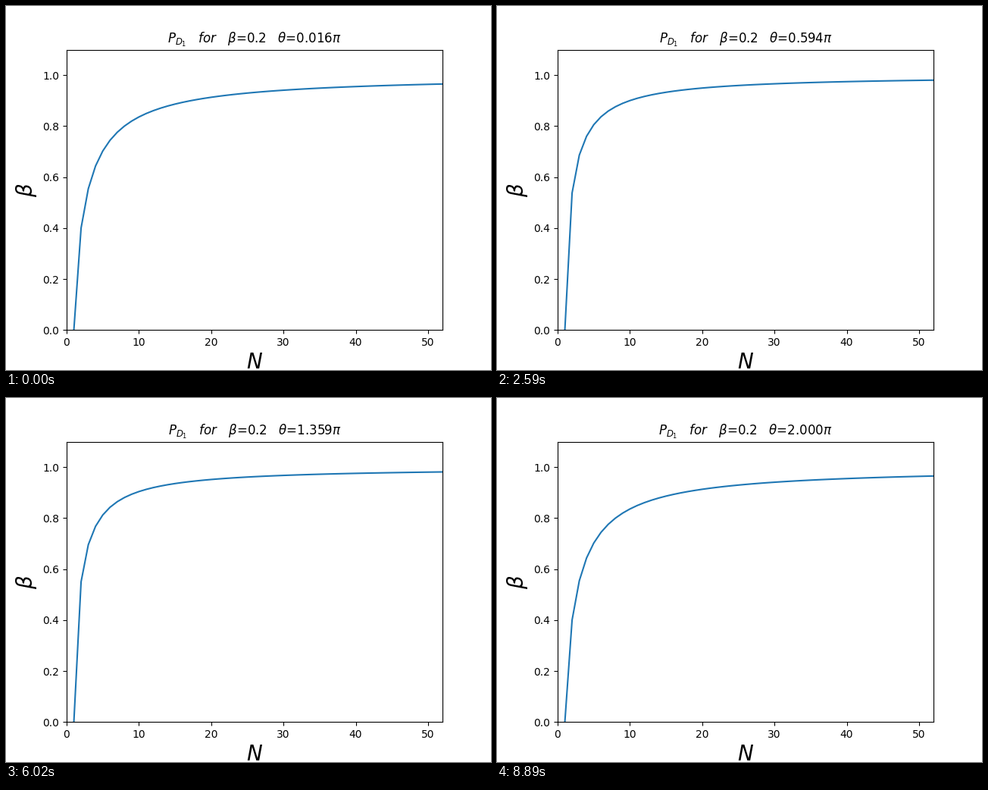
A matplotlib script for the animation above (8960 ms loop, 640x480 px).

```python
import numpy as np
import matplotlib.pyplot as plt
from matplotlib.animation import FuncAnimation

FRAMES = 128
INTERVAL = 70
BETA = 0.2
CYCLES = np.arange(1, 61)


def survival(n, theta):
    """Amplitude left in the first arm after n weak rotations with a lossy second arm."""
    c, s = np.cos(np.pi / (2 * n)), np.sin(np.pi / (2 * n))
    loss = BETA * np.exp(1j * theta)
    step = np.array([[c, -s], [loss * s, loss * c]])
    return abs(np.linalg.matrix_power(step, n)[0, 0])


fig, ax = plt.subplots(figsize=(6.4, 4.8), dpi=100)
line, = ax.plot([], [], color="C0", lw=1.5)
ax.set_xlim(0, 52)
ax.set_ylim(0, 1.1)
ax.set_xlabel("$N$", fontsize=20)
ax.set_ylabel(r"$\beta$", fontsize=20)
title = ax.set_title("")


def update(i):
    turn = 2 * (i + 1) / FRAMES
    line.set_data(CYCLES, [survival(n, turn * np.pi) for n in CYCLES])
    title.set_text(rf"$P_{{D_1}}$   $for$   $\beta$={BETA}   $\theta$={turn:.3f}$\pi$")
    return line, title


anim = FuncAnimation(fig, update, frames=FRAMES, interval=INTERVAL,
                     repeat=True, repeat_delay=0)
plt.show()
```
